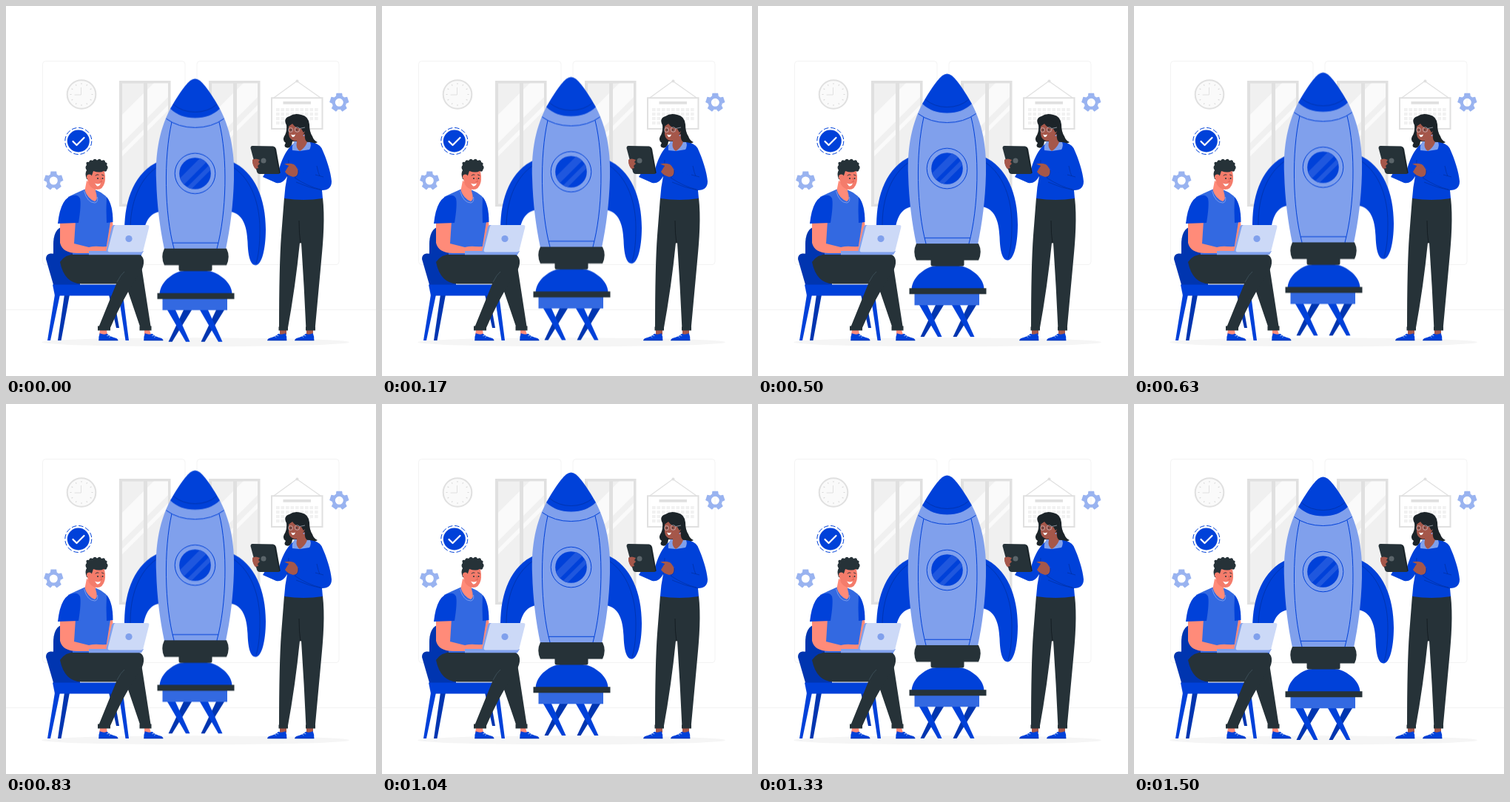
These frames come from a looping animation (500x500 px, 1.54 s). An HTML page:

```html
<!DOCTYPE html>
<html lang="en">
<head>
<meta charset="utf-8">
<title>Rocket workshop</title>
<style>
  html, body { margin: 0; width: 100%; height: 100%; overflow: hidden; background: #fff; }
  svg { display: block; width: 100%; height: 100%; }
  .blue { fill: #0041d9; }
  .navy { fill: #0035b0; }
  .mid { fill: #3369e1; }
  .light { fill: #80a0ec; }
  .dark { fill: #263238; }
  .skin { fill: #ff8b79; }
  .brown { fill: #a5574a; }
  .line { fill: none; stroke: #0041d9; stroke-width: 1; }
  .fold { fill: none; stroke: #0031a6; stroke-width: .8; }
  .grey { fill: none; stroke: #e0e0e0; }
  .ink { fill: none; stroke: #263238; stroke-width: .9; stroke-linecap: round; }
</style>
</head>
<body>
<svg viewBox="0 0 500 500">
  <defs>
    <clipPath id="panes"><path d="M157 104.500h29v163h-29zM191 104.500h28v163h-28z"/></clipPath>
    <clipPath id="glass"><circle cx="255.500" cy="226.500" r="21.300"/></clipPath>
    <g id="window">
      <path fill="#e0e0e0" d="M153 101h69.500v170H153z"/>
      <g clip-path="url(#panes)">
        <path fill="#f0f0f0" d="M157 104h62v164h-62z"/>
        <path fill="#fafafa" d="M150 154L204 100H242L150 192zM150 203L222 131V138L150 210z"/>
      </g>
    </g>
    <g id="shoe">
      <path class="blue" d="M0 9.500Q-.5 4 1.500 -.5Q7 2 11 0Q16 4.500 23 6Q26 7 26 9.500z"/>
      <path d="M0 8.600H26" stroke="#0031a6" stroke-width=".7"/>
      <path d="M11 3l3-1M14 5l2-1.500" stroke="#fff" stroke-width=".7"/>
    </g>
    <g id="trestle">
      <path class="navy" d="M240 411h11L224.500 454H219.500z"/>
      <path class="blue" d="M218 411h11L248.500 454H243z"/>
    </g>
  </defs>

  <!-- room -->
  <g fill="none" stroke="#f3f3f3">
    <rect x="49.500" y="74.500" width="192.500" height="275" rx="4"/>
    <rect x="258" y="74.500" width="192" height="275" rx="4"/>
    <path d="M0 410.500H500"/>
  </g>
  <ellipse cx="256" cy="454.300" rx="208" ry="6" fill="#f5f5f5"/>
  <use href="#window"/>
  <use href="#window" x="121"/>
  <circle class="grey" cx="102" cy="119.500" r="19.300" stroke-width="2" style="fill:#fafafa"/>
  <g id="ticks" stroke="#d8d8d8"></g>
  <path class="grey" d="M101.500 110V120H92.500"/>
  <path class="grey" d="M362 124L393 101.500L425 124" stroke-width="1.200"/>
  <circle cx="393.500" cy="101.500" r="2" fill="#e0e0e0"/>
  <path class="grey" d="M359 124.200H427.500V166H359z" stroke-width="2" style="fill:#fff"/>
  <path fill="#e0e0e0" d="M374.500 129h37.500v3.700h-37.500z"/>
  <g id="days" fill="#f1f1f1"></g>
  <g id="gears" fill="#99b3f0" stroke="none"></g>
  <circle class="blue" cx="97.800" cy="182.500" r="15"/>
  <circle class="line" cx="97.800" cy="182.500" r="18" stroke-dasharray="6.500 2.900"/>
  <path d="M90.500 183L95.500 188L105.500 178" fill="none" stroke="#fff" stroke-width="2.200" stroke-linecap="round" stroke-linejoin="round"/>

  <!-- rocket and its stand -->
  <g id="rocket">
    <g id="fin">
      <path class="blue" d="M304 210C337 224 351 262 351 302C351 331 345 350.500 337.500 350.500C329 350.500 327 334 326.500 319C325.500 297 320 281 303 278z"/>
      <path class="fold" d="M307 218C332 235 343 268 343 302C343 325 341 338 338 348"/>
    </g>
    <use href="#fin" transform="matrix(-1 0 0 1 511 0)"/>
    <use href="#trestle"/>
    <use href="#trestle" x="44"/>
    <path class="mid" d="M211.500 395h87.500v16.300h-87.500z"/>
    <path class="blue" d="M207.500 390C208 371 230 358 241 358H271C282 358 305.500 371 305.500 390z"/>
    <path class="dark" d="M204.500 388.300h104v8h-104z"/>
    <rect class="dark" x="233.500" y="345" width="45" height="13.500" rx="2.500"/>
    <path class="light" d="M222 139C205 172 202 205 203 235C204 270 208 300 214 329H297C303 300 307 270 308 235C309 205 306 172 289 139z"/>
    <path class="blue" d="M222 139C230 125 240 109 249 101Q255.500 96 262 101C271 109 281 125 289 139Q276 151.500 255.500 151.500Q235 151.500 222 139z"/>
    <path class="fold" d="M226 133Q238 143.500 255.500 143.500Q273 143.500 285 133"/>
    <path class="line" d="M216.500 152.500Q233 164.500 255.500 164.500Q278 164.500 294.500 152.500M224 157C213 205 214 280 227 328M288 157C300 205 298 280 285 328M225 320.300H287"/>
    <circle class="line" cx="255.500" cy="226.500" r="27.300"/>
    <circle class="blue" cx="255.500" cy="226.500" r="21.300"/>
    <g clip-path="url(#glass)" stroke="#1f57de">
      <path d="M230 245L275 200" stroke-width="10"/>
      <path d="M240 254L284 210" stroke-width="6"/>
    </g>
    <path class="dark" d="M214 328H298Q303.500 339 298 350.500H214Q208.500 339 214 328z"/>
  </g>

  <!-- seated man -->
  <g>
    <path class="navy" d="M74 299Q64 304 64 322V336L100 350V299z"/>
    <path class="navy" d="M79 390h7L74.500 452H70zM139 390h6L153 435H149z"/>
    <path class="blue" d="M66 390h7L60 452H56zM152 390h6L166 452H161.500z"/>
    <path class="navy" d="M54 342Q54 335 60 334.500L100 336V380H65z"/>
    <path class="blue" d="M63 376.500H150V391.500H66z"/>
    <path class="skin" d="M132 292H144L145 300L139 328L130 325z"/>
    <path class="dark" d="M150 352L182 345L196 436H182L163 380z"/>
    <path class="dark" d="M73 346Q80 335 96 335H176Q187 336 186 348Q185 356 179 363Q157 397 140 437H124L149 375.500H102Q79 375 73 346z"/>
    <path d="M150 373Q155 363 160 359" fill="none" stroke="#455a64" stroke-width=".7"/>
    <path class="skin" d="M127 438h9l1 6h-11zM187 438h7l2 6h-9z"/>
    <path class="dark" d="M124 432.500h17v6h-17zM180.500 432.500h16v6h-16z"/>
    <use href="#shoe" x="125.300" y="442.800"/>
    <use href="#shoe" x="186.300" y="442.800"/>
    <path class="mid" d="M108 247Q94 253 84 258L90 336H134L141 292Q145 272 135 257Q128 251 120 248z"/>
    <path class="blue" d="M136 258Q144.500 268 144.500 292L136 293Q135 275 136 258z"/>
    <path class="skin" d="M109 236L121 245V250Q125 262 120 264Q110 260 106.500 249Z"/>
    <path d="M105.500 250Q110 266 120 266Q125 265 123.500 258" fill="none" stroke="#80a0ec" stroke-width=".9"/>
    <path class="skin" d="M73 290H94L92 321L112 326L136 325V334H97Q76 334 73 320z"/>
    <path class="blue" d="M92 256Q74 257 70 294L98 293Q102 268 100 260Q97 255 92 256z"/>
    <path fill="#f47c6b" d="M112 220H132Q135 230 133.500 238Q131 248 123.500 248Q116 248 112 241L109 231z"/>
    <path class="dark" d="M109 234Q106 226 109 222Q106 218 109 215Q107 210 112 211Q113 207 117 209Q120 205 123 208.500Q127 205 129 209Q134 207 134 211Q138 212 136 215Q139 218 136.500 221Q136 225 132 223Q127 226 118 223L116 229L113 234z"/>
    <circle fill="#f47c6b" cx="112.500" cy="231" r="3.500"/>
    <path class="ink" d="M121 229Q123 227 125 228M129.500 228L132 229"/>
    <circle class="dark" cx="124" cy="233" r="1"/>
    <circle class="dark" cx="130.500" cy="233" r="1"/>
    <path d="M127.500 232L129.500 237.500H126.500" fill="none" stroke="#d95f52" stroke-width=".8"/>
    <path fill="#fff" d="M120 239.500Q124 241.500 128 239.500Q126.500 244 123 243.500z"/>
    <path class="skin" d="M112 326Q124 323 135 327L140 331H112z"/>
    <path class="light" d="M112 331H186L183 336.200H112z"/>
    <path class="light" d="M145 296H150L141 332.500H137Q135 332 135.500 330L143 298z"/>
    <path fill="#ccd9f7" d="M148.500 296H191Q194 296 193.300 299L185.500 330Q185 332.500 182 332.500H139.500Q137 332 137.800 329L145.500 299Q146 296 148.500 296z"/>
    <circle class="light" cx="166" cy="314.500" r="4.600"/>
  </g>

  <!-- standing woman -->
  <g>
    <path fill="#1c2429" d="M379 161Q374 152 383 149Q390 144 399 147Q409 149 410 160Q410 170 414 176Q416 182 421 184Q414 189 403 184L387 183Q386 194 378 191Q375 189 378 185Q373 182 376 176Q380 170 379 161z"/>
    <path class="brown" d="M370 433h9v11h-9zM406 433h9v11h-9z"/>
    <path class="dark" d="M376 259H428C431 285 429 315 426 345L417.500 437.500H405.500Q403 380 399 320H397Q391 380 380.500 437.500H369Q369 350 372 310z"/>
    <path d="M396 290Q396 308 398 321" fill="none" stroke="#11191d" stroke-width=".8"/>
    <path class="dark" d="M368.500 433.500h12.500v5h-12.500zM405 433.500h13v5h-13z"/>
    <use href="#shoe" transform="matrix(-1 0 0 1 379.300 442.800)"/>
    <use href="#shoe" transform="matrix(-1 0 0 1 416.300 442.800)"/>
    <path class="blue" d="M389 186L411 184Q422 185 426.500 192C433 206 439 224 440 237Q440 249 427 249L428 260Q402 264 376 260Q377 244 380 230Q374 241 365 239L347 231L350 226L368 225C371 211 379 192 389 186z"/>
    <path class="fold" d="M380 230Q382 220 382 208M427 249Q410 246 392 238M420 216Q422 226 424 230"/>
    <path class="light" d="M390 183Q386 188 387 195L397 196L410 194Q413 189 411 184z"/>
    <path class="brown" d="M392 176L404 173Q403 181 407 184Q404 192 397 196Q391 192 393 184z"/>
    <path class="brown" d="M382 163Q386 157 396 158L403 165Q406 169 401 174Q398 183 390 182.500Q383 181 382 173z"/>
    <path fill="#1c2429" d="M380 165Q381 153 392 153Q402 155 406 167L402 171L399 166Q391 165 387 159Q383 161 380 165z"/>
    <g fill="none" stroke="#cbd0dd" stroke-width=".6">
      <circle cx="384.500" cy="167.500" r="3"/>
      <circle cx="393.500" cy="167" r="3.300"/>
      <path d="M397 165.500L404 164"/>
    </g>
    <circle class="dark" cx="385" cy="167.500" r=".9"/>
    <circle class="dark" cx="393" cy="167.500" r=".9"/>
    <path fill="#fff" d="M385 173.500Q388 175 391 173.500Q390 177.500 387 177z"/>
    <circle cx="402.500" cy="175" r=".9" fill="#80a0ec"/>
    <path class="brown" d="M350 225L343 219L338 221Q333 216 333 208Q337 204 344 208L355 222z"/>
    <path class="dark" d="M333 189L361 189.500Q364 190 365 193L370.500 224Q370.500 227 368 227H343Q340 227 339 224L330.500 192Q330.500 189 333 189z"/>
    <path d="M363 191L370 226" stroke="#141c20" stroke-width="1"/>
    <circle cx="348" cy="209" r="3.500" fill="#5b656a"/>
    <path class="brown" d="M333 208Q337 205 343 208L341 211L343 213L340 216L341 219L337 220Q333 216 333 208z"/>
    <path class="brown" d="M376 213.500Q383 212 389 214Q395 218 396 229L388 231Q380 229 377 224L380 219L382 216z"/>
    <path class="blue" d="M395 222L429 232L433 248Q415 247 390 232Q395 229 395 222z"/>
    <path class="fold" d="M395 222Q396 229 390 232Q408 244 425 248M429 231L418 228"/>
  </g>
</svg>
<script>
  const NS = 'http://www.w3.org/2000/svg';
  const LOOP = 1540;
  const byId = id => document.getElementById(id);

  function add(parent, tag, attrs) {
    const el = document.createElementNS(NS, tag);
    for (const key in attrs) el.setAttribute(key, attrs[key]);
    return parent.appendChild(el);
  }

  function gear(x, y, teeth = 5) {
    const g = add(byId('gears'), 'g', { transform: `translate(${x} ${y})` });
    add(g, 'circle', { r: 7.6, fill: 'none', stroke: '#99b3f0', 'stroke-width': 4.2 });
    for (let i = 0; i < teeth; i++) {
      add(g, 'path', { d: 'M-4.500-8.500L-3.800-12.600H3.800L4.500-8.500z', transform: `rotate(${i * 360 / teeth})` });
    }
  }

  gear(64.3, 236);
  gear(450.3, 130.3);

  for (let i = 0; i < 12; i++) {
    add(byId('ticks'), 'path', { d: 'M102 104v2', transform: `rotate(${i * 30} 102 119.500)` });
  }

  for (let row = 0; row < 4; row++) {
    for (let col = 0; col < 9; col++) {
      if (row === 3 && col > 6) continue;
      add(byId('days'), 'rect', { x: 365 + col * 6.5, y: 138 + row * 6, width: 4.6, height: 4.2 });
    }
  }

  // [time in ms, vertical shift]
  const lift = [[0, -0.25], [735, -10], [1490, 0], [LOOP, 0]];
  byId('rocket').animate(
    lift.map(([t, y]) => ({ offset: t / LOOP, transform: `translateY(${y}px)` })),
    { duration: LOOP, iterations: Infinity, easing: 'linear' }
  );
</script>
</body>
</html>
```
